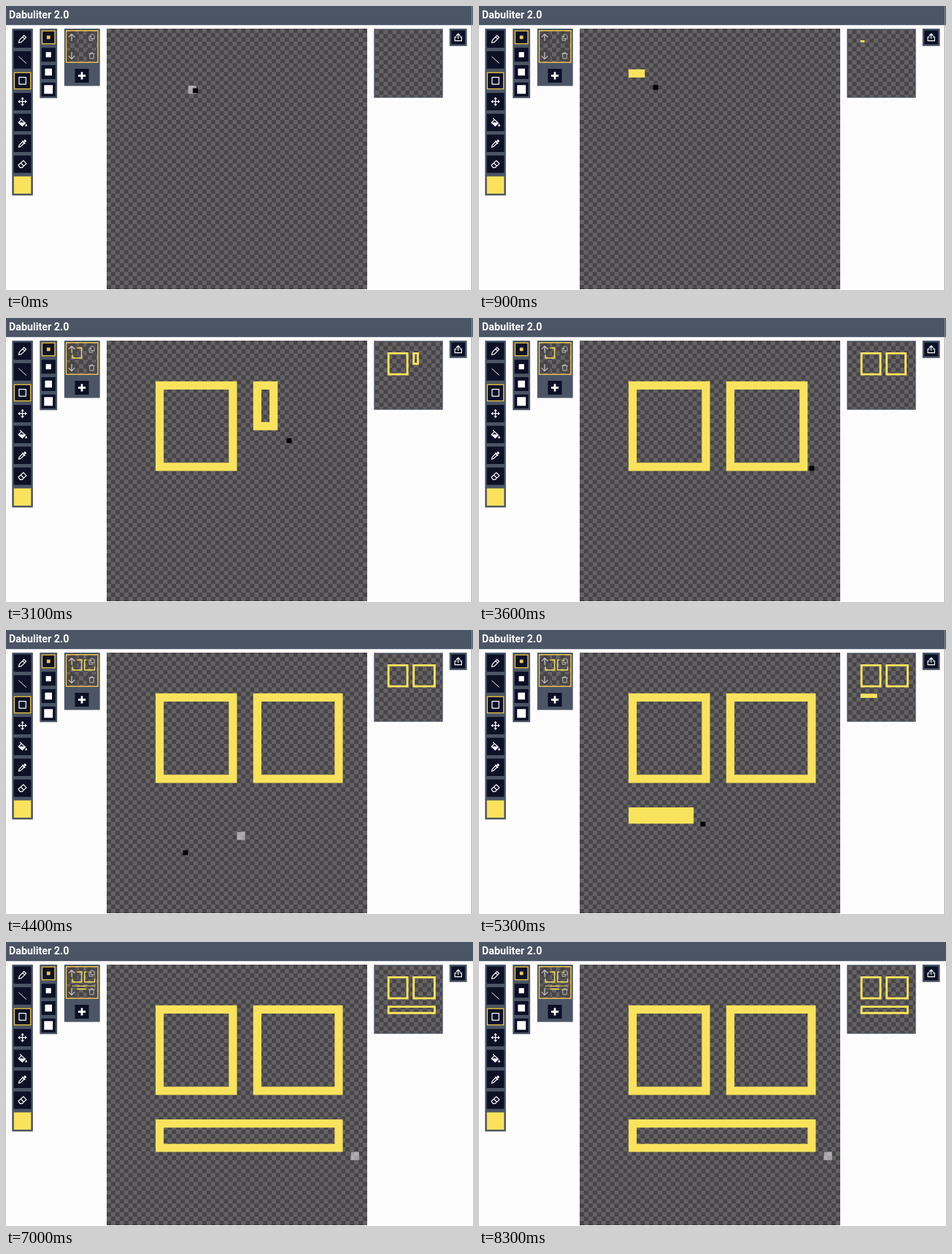
Recreate the animation shown at these times as an HTML page. Size 640x389 px, loop 8400 ms.

```html
<!DOCTYPE html>
<html lang="en">
<head>
<meta charset="utf-8">
<title>Dabuliter 2.0</title>
<style>
  html, body { margin: 0; width: 100%; height: 100%; overflow: hidden; background: #fefdfe; }
  svg { display: block; position: absolute; left: 0; top: 0; }
  .title { font: 700 14.28px Roboto, Arial, sans-serif; fill: #fff; }
  .panel { fill: #4b5565; }
  .btn { fill: #0c1126; }
  .ring { fill: none; stroke: #f2c84a; stroke-width: 1.4; }
  .ink { fill: #f9e35c; fill-rule: evenodd; }
  .solid { fill: #fff; }
  .line, .thin, .soft { fill: none; stroke: #fff; stroke-linejoin: round; stroke-linecap: round; }
  .line { stroke-width: 1.2; }
  .thin { stroke-width: .9; }
  .soft { stroke: #c4c4c4; }
</style>
</head>
<body>
<svg id="stage" width="640" height="389" viewBox="0 0 640 389"></svg>
<script>
const LOOP = 8400, STEP = 100, LAG = 100;
const U = 11.9;                     // one rem; also one checker tile
const TOP = 31, GAP = .2 * U;
const main = { x: 138, y: TOP, side: 30 * U };
const view = { x: 505.5, y: 32.5, side: 92 };
const layer = { x: 82.1, y: 33.4, side: 44.2 };
const CELL = main.side / 32;
const stage = document.getElementById('stage');

function add(tag, attrs, parent = stage) {
  const el = document.createElementNS('http://www.w3.org/2000/svg', tag);
  for (const k in attrs) el.setAttribute(k, attrs[k]);
  return parent.appendChild(el);
}
const box = (x, y, width, height, attrs) => add('rect', { x, y, width, height, ...attrs });
const square = (cx, cy, s, attrs) => box(cx - s / 2, cy - s / 2, s, s, attrs);
const icon = (x, y, d, cls = 'line', turn = 0) =>
  add('path', { d, class: cls, transform: `translate(${x} ${y}) rotate(${turn})` });

function checker(id, { x, y, side }) {
  const h = U / 2;
  const tile = add('pattern', { id, x, y, width: U, height: U, patternUnits: 'userSpaceOnUse' });
  add('rect', { width: U, height: U, fill: '#474547' }, tile);
  add('path', { d: `M0 0h${h}v${U}h${h}v${-h}H0z`, fill: '#656265' }, tile);
  box(x, y, side, side, { fill: `url(#${id})` });
}

// A column of square buttons; returns the centre of each
function column(x, size, count, chosen) {
  box(x, TOP, size, size * count, { class: 'panel' });
  return Array.from({ length: count }, (_, i) => {
    const c = [x + size / 2, TOP + size * (i + .5)], inner = size - 2 * GAP;
    square(...c, inner, { class: 'btn' });
    if (i === chosen) square(...c, inner - 1.4, { class: 'ring' });
    return c;
  });
}

box(0, 0, 640, 2.2 * U, { class: 'panel' });
add('text', { class: 'title', x: 4, y: 17.3 }).textContent = 'Dabuliter 2.0';

// Tools
const tools = column(8.3, 2.4 * U, 8, 2);
const [pencil, line, rect, move, bucket, picker, eraser, swatch] = tools;
icon(...pencil, 'M-5 5l.6-3.4L2.2-5 5-2.2-1.6 4.4zM.2-3L3-.2');
icon(...line, 'M-5-4.5L5 4.5', 'thin');
square(...rect, 9.4, { class: 'line' });
for (let turn = 0; turn < 360; turn += 90) {
  icon(...move, 'M0 0v-4', 'line', turn);
  icon(...move, 'M0-6.2l2.4 2.8h-4.8z', 'solid', turn);
}
icon(...bucket, 'M-3-5.5L3.8.8l-4 4-5.2-4.6 3.6-3.6');
icon(...bucket, 'M-5.4 0H4L-.2 5zM5 1.8q2.6 3.6 0 3.8-2.6-.2 0-3.8z', 'solid');
icon(...picker, 'M-5.2 5.2l.7-2.6L.4-2.3l2 2-4.9 4.9z');
icon(...picker, 'M-1-3l1-1L4.2.2l-1 1zM1.4-3.4l2-2 2.2 2.2-2 2z', 'solid');
icon(...eraser, 'M-5.6 1.4L1.2-5 5.4-.8-.6 4.8h-2.6zM-2.4-1.6L1.8 2.6');
square(...swatch, 2 * U, { class: 'ink' });

// Brush sizes
column(46.3, 2 * U, 4, 0).forEach((c, i) =>
  square(...c, (i + 2) * GAP, { fill: i ? '#fff' : '#f2c84a' }));

// Layer card
box(79.9, TOP, 48.8, 78.5, { class: 'panel' });
checker('checkLayer', layer);
const layerInk = add('path', { class: 'ink' });
const [left, right, up, down] = [90, 117.5, 43, 68];
for (const x of [left, right]) for (const y of [up, down])
  square(x, y, 15, { fill: '#474547', 'fill-opacity': .75 });
const arrow = 'M0 4.5v-9M-4-.6l4-4 4 4';
icon(left, up, arrow, 'line soft');
icon(left, down, arrow, 'line soft', 180);
icon(right, up, 'M-1-4h2.8l1.8 1.8v4H-1zM-1-1.6h-2.4v5.8h4.6V2', 'thin soft');
icon(right, down, 'M-3.8-2.6h7.6M-1.4-2.8v-1.4h2.8v1.4M-2.9-2.4l.4 6.4h5l.4-6.4', 'thin soft');
box(layer.x + .4, layer.y + .4, layer.side - .8, layer.side - .8, { class: 'ring' });
square(104, 95.5, 1.6 * U, { class: 'btn' });
for (const turn of [0, 90])
  add('rect', { x: -5, y: -1.4, width: 10, height: 2.8, class: 'solid', transform: `translate(104 95.5) rotate(${turn})` });

// Canvas, preview and export
checker('checkMain', main);
square(view.x + view.side / 2, view.y + view.side / 2, view.side + 2.4, { class: 'panel' });
checker('checkView', view);
const [share] = column(607.8, 2 * U, 1);
icon(...share, 'M0 1.6v-6.4M-2.5-2.4L0-4.9l2.5 2.5M-2.6-.6h-2v5.4h9.2V-.6h-2');
const edge = box(638, 0, 1, 389, { fill: '#8d9299' });

const mainInk = add('path', { class: 'ink' });
const viewInk = add('path', { class: 'ink' });
const hover = box(0, 0, CELL, CELL, { fill: '#fff', 'fill-opacity': .5 });
const pointer = box(0, 0, 7, 6.6, { fill: '#000' });

// Pointer stops: time, x, y
const path = [
  [0, 259.5, 116], [600, 211, 92], [800, 224, 96], [900, 242, 111.5],
  [1800, 315, 207], [1900, 323, 212], [2600, 345, 93], [3000, 368, 150],
  [3100, 388, 168], [3600, 456, 206], [4000, 456, 208], [4300, 322, 282],
  [4400, 246, 305], [4800, 211, 250], [5900, 422, 285], [6000, 460, 287], [6300, 480, 294]
];
// Dragged boxes: first and last cell, press and release time
const shapes = [
  { a: [6, 5], b: [15, 15], from: 600, to: 2000 },
  { a: [18, 5], b: [28, 15], from: 2800, to: 4000 },
  { a: [6, 19], b: [28, 22], from: 4900, to: 6300 }
];

function at(t) {
  const i = path.findIndex(p => p[0] > t);
  if (i < 1) return path.at(i).slice(1);
  const [t0, ...p] = path[i - 1], [t1, ...q] = path[i];
  return p.map((v, n) => v + (q[n] - v) * (t - t0) / (t1 - t0));
}
function cellAt(t) {
  const [x, y] = at(t);
  return [Math.floor((x - main.x) / CELL), Math.floor((y - main.y) / CELL)];
}

// Outline one cell thick, drawn on a board of 32 cells
function outline({ a, b }, { x, y, side }) {
  const s = side / 32;
  const ring = n => {
    const w = (b[0] - a[0] + 1 - 2 * n) * s, h = (b[1] - a[1] + 1 - 2 * n) * s;
    return w > .01 && h > .01 ? `M${x + (a[0] + n) * s} ${y + (a[1] + n) * s}h${w}v${h}h${-w}z` : '';
  };
  return ring(0) + ring(1);
}
const paint = (el, list, board) => el.setAttribute('d', list.map(s => outline(s, board)).join(''));
const place = (el, x, y, shown) => {
  el.setAttribute('x', x);
  el.setAttribute('y', y);
  el.setAttribute('visibility', shown ? 'visible' : 'hidden');
};

function draw(t) {
  const cell = cellAt(t - LAG);
  const live = shapes.filter(s => t >= s.from).map(({ a, b, to }) => {
    const done = t >= to;
    return { a, done, b: done ? b : b.map((v, i) => Math.max(a[i], Math.min(v, cell[i]))) };
  });
  paint(mainInk, live, main);
  paint(viewInk, live, view);
  paint(layerInk, live.filter(s => s.done), layer);

  const [x, y] = at(t), inside = t < 6500;
  place(hover, main.x + cell[0] * CELL, main.y + cell[1] * CELL, live.every(s => s.done));
  place(pointer, x - 3.5, y - 3.3, inside);
  edge.setAttribute('visibility', inside ? 'visible' : 'hidden');
}

const start = performance.now();
function tick() {
  const t = (performance.now() - start) % LOOP;
  draw(Math.floor(t / STEP) * STEP);
  requestAnimationFrame(tick);
}
tick();
</script>
</body>
</html>
```
